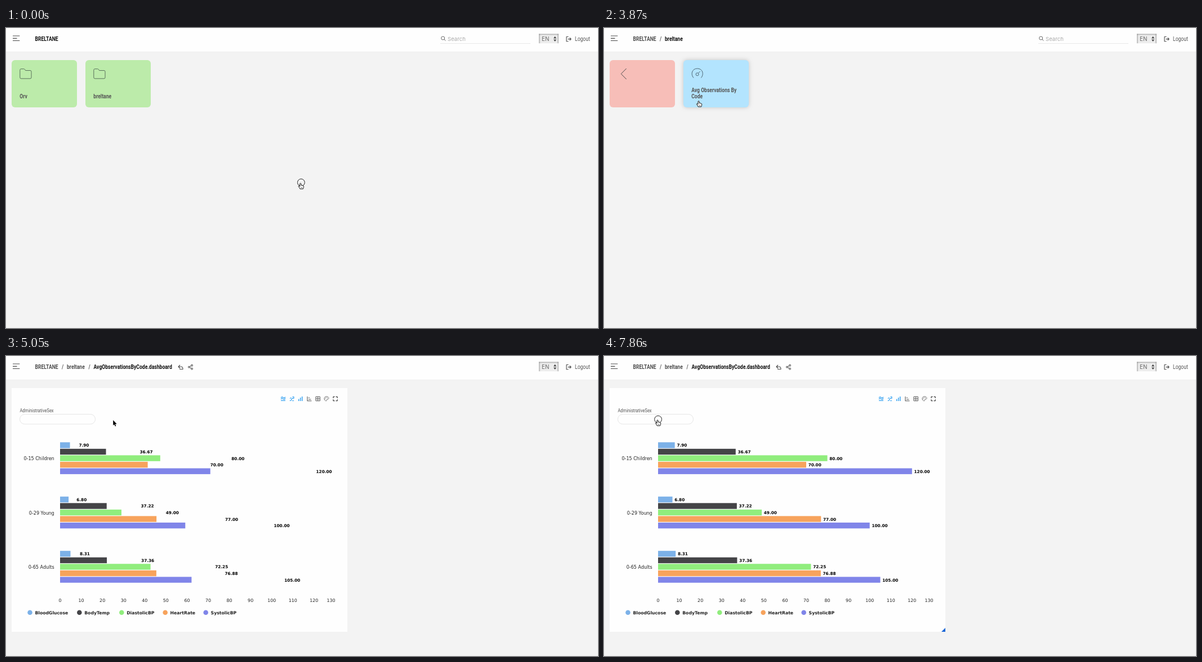
Write an HTML page with a canvas that moves like this. It is 1051 by 533 pixels and loops after 8 s.

```html
<!DOCTYPE html>
<html lang="en">
<head>
<meta charset="utf-8">
<title>Dashboard walkthrough</title>
<style>
  html, body { margin: 0; width: 100%; height: 100%; overflow: hidden; background: #f3f3f3; }
  canvas { display: block; }
</style>
</head>
<body>
<canvas id="stage" width="1051" height="533"></canvas>
<script>
const ctx = document.getElementById('stage').getContext('2d');
const LOOP = 8000;
const NARROW = 0.86; // condensed face for all interface text
const UI = 'Roboto, sans-serif';
const INPUT = 'Inter, sans-serif';
const CHART = '"DejaVu Sans", sans-serif';
const DARK = '#4a4a4a', BLUE = '#2b9df0';

const ROOT = 'BRELTANE', FOLDER = 'breltane';
const TILE = { x: 141, y: 57, w: 116, h: 84 };

// Pointer stops: time, x, y, shape
const STOPS = [
  [0, 522.8, 275.5, 'press'], [150, 480, 272, 'arrow'], [300, 370, 265, 'arrow'],
  [450, 297.5, 261.5, 'arrow'], [750, 304, 263, 'arrow'], [900, 309, 264, 'arrow'],
  [1350, 300, 245, 'arrow'], [1490, 270, 200, 'arrow'], [1640, 235, 155, 'arrow'],
  [1780, 207, 113, 'hand'], [1930, 200.6, 103, 'hand'], [2680, 200.6, 103, 'press'],
  [2820, 200.6, 103, 'hand'], [3120, 330, 150, 'arrow'], [3270, 560, 190, 'arrow'],
  [3420, 643, 198, 'arrow'], [3570, 570, 180, 'arrow'], [3720, 310, 150, 'arrow'],
  [3870, 168, 129.5, 'hand'], [4170, 168, 129.5, 'press'], [4320, 190.2, 114, 'arrow'],
  [5340, 420, 140, 'arrow'], [5490, 575.8, 161.3, 'arrow'], [6090, 640, 150, 'arrow'],
  [6240, 735, 138, 'arrow'], [6390, 780, 130, 'arrow'], [6540, 792, 125, 'arrow'],
  [6680, 775, 122, 'arrow'], [6830, 715, 121, 'arrow'], [6980, 635, 125, 'arrow'],
  [7130, 573, 131, 'arrow'], [7270, 440, 125, 'arrow'], [7420, 260, 117, 'arrow'],
  [7560, 140, 113, 'hand'], [7710, 95, 113.5, 'hand'], [7860, 95, 113.5, 'press']
];
const PAINTS = [4320, 4460, 4610, 4760, 4900, 5050, 5200, 5340, 5490];

const SERIES = [
  ['BloodGlucose', '#7cb1e8', 42.5, [7.9, 6.8, 8.31]],
  ['BodyTemp', '#444447', 130.3, [36.67, 37.22, 37.36]],
  ['DiastolicBP', '#90ed7d', 205.3, [80, 49, 72.25]],
  ['HeartRate', '#f7a35c', 282.7, [70, 77, 76.88]],
  ['SystolicBP', '#8085e9', 354.7, [120, 100, 105]]
];
const GROUPS = ['0-15 Children', '0-29 Young', '0-65 Adults'];

function write(s, x, y, size, color, { bold = false, align = 'left', face = UI } = {}) {
  ctx.save();
  ctx.font = `${bold ? 'bold ' : ''}${size}px ${face}`;
  ctx.textAlign = align;
  ctx.fillStyle = color;
  ctx.translate(x, y);
  if (face === UI) ctx.scale(NARROW, 1);
  ctx.fillText(s, 0, 0);
  ctx.restore();
}

function line(d, color = DARK, width = 1, x = 0, y = 0) {
  ctx.save();
  ctx.translate(x, y);
  ctx.strokeStyle = color;
  ctx.lineWidth = width;
  ctx.lineJoin = 'round';
  ctx.stroke(new Path2D(d));
  ctx.restore();
}

function shape(d, color, x = 0, y = 0) {
  ctx.save();
  ctx.translate(x, y);
  ctx.fillStyle = color;
  ctx.fill(new Path2D(d));
  ctx.restore();
}

function rect(x, y, w, h, color) {
  ctx.fillStyle = color;
  ctx.fillRect(x, y, w, h);
}

function dot(x, y, r, color) {
  ctx.fillStyle = color;
  ctx.beginPath();
  ctx.arc(x, y, r, 0, Math.PI * 2);
  ctx.fill();
}

function header(crumbs, search) {
  rect(0, 0, 1051, 42, '#fefefe');
  rect(0, 42, 1051, 1, '#efefef');
  line('M12 14H24.3M12 18.3H19.5M12 22.5H24.3', DARK, 1.2);
  const xs = [51.5, 108, 155.5];
  crumbs.forEach((c, i) => {
    const last = i === crumbs.length - 1;
    write(c, xs[i], 23.4, 10, last ? '#111' : '#505050', { bold: true });
    if (!last) write('/', xs[i + 1] - 9, 23.4, 10, '#555', { bold: true });
  });
  if (search) {
    line('M778.7 18A3 3 0 1 1 772.7 18A3 3 0 1 1 778.7 18M777.9 20.2L780.5 22.7', '#666');
    write('Search', 784, 23.2, 9.6, '#aaa', { face: INPUT });
    rect(771, 27, 160, 1, '#e8e8e8');
  } else {
    line('M309 16L306 19L309 22M306 19H311Q314 19 314 23.5H308', DARK, 1.1);
    line('M330 16.7L325 19.6L330 22.7', DARK);
    for (const [x, y] of [[330, 16.7], [325, 19.6], [330, 22.7]]) {
      dot(x, y, 1.9, DARK);
      dot(x, y, 0.9, '#fff');
    }
  }
  language();
  line('M998.5 15.5H995V23.8H998.5M997.5 19.6H1003M1000.7 17.1L1003.2 19.6L1000.7 22.1', DARK, 1.1);
  write('Logout', 1010, 23.4, 10, '#555');
}

function language() {
  rect(946, 10.5, 35, 16.7, '#ededed');
  const edge = (x0, y0, x1, y1, w, h) => {
    const g = ctx.createLinearGradient(x0, y0, x1, y1);
    g.addColorStop(0, 'rgba(120,120,120,.55)');
    g.addColorStop(1, 'rgba(120,120,120,0)');
    rect(Math.min(x0, x1), y0, w, h, g);
  };
  edge(946, 10.5, 946, 13.5, 35, 3);
  edge(946, 10.5, 949, 10.5, 3, 16.7);
  edge(981, 10.5, 978, 10.5, 3, 16.7);
  write('EN', 951, 23.3, 9.8, '#666', { face: INPUT });
  shape('M972 18.4L974.6 14.8L977.2 18.4ZM972 20.4L974.6 24L977.2 20.4Z', '#444');
}

function tile(x, color, hover) {
  ctx.save();
  if (hover) {
    ctx.shadowColor = 'rgba(0,0,0,.2)';
    ctx.shadowBlur = 7;
  }
  ctx.fillStyle = color;
  ctx.beginPath();
  ctx.roundRect(x, TILE.y, TILE.w, TILE.h, 6);
  ctx.fill();
  ctx.restore();
}

function folder(x, name, hover) {
  tile(x, '#bcebaa', hover);
  line('M2 0H6.8Q8 0 8.6 1L9.8 2.8H18.2Q20.2 2.8 20.2 4.8V15.2Q20.2 17.2 18.2 17.2H2Q0 17.2 0 15.2V2Q0 0 2 0Z',
    '#58705a', 1, x + 14.8, 72.7);
  write(name, x + 14.3, 125, 10, '#555', { bold: true });
}

function homePage(hover) {
  header([ROOT], true);
  folder(10, 'Orv', false);
  folder(TILE.x, FOLDER, hover);
}

function folderPage(hover) {
  header([ROOT, FOLDER], true);
  tile(10, '#f7beb8', false);
  line('M39.7 72L30.3 81.5L39.7 91', DARK);
  tile(TILE.x, '#b3e4fe', hover);
  line('M159 88.5C153.5 82.5 156 72 165.7 72C175.4 72 177.9 82.5 172.4 88.5', '#4d6674');
  line('M168.1 82.2A2.5 2.5 0 1 1 163.1 82.2A2.5 2.5 0 1 1 168.1 82.2M167.4 80.3L170.7 77', '#4d6674');
  write('Avg Observations By', 155.2, 114.2, 10, '#555', { bold: true });
  write('Code', 155.2, 125, 10, '#555', { bold: true });
}

function toolbar() {
  line('M488 74.2Q490 71.8 492 73.6T496 73M488 76.7Q490 74.3 492 76.1T496 75.5M488 79.2H496', BLUE, 1.2);
  line('M503.7 79Q506 80 507 77T511.3 75.5M504 75.5L506.5 74M508.5 72.5H511V75M508 79.5H511', BLUE, 1.1);
  line('M519.7 76.5V80M522.7 74V80M525.7 72V80', BLUE, 1.4);
  line('M535 72V79.8H542.5M537 74H539M537 77H541.5', '#555', 1.1);
  line('M550 72.3H557.4V79.7H550ZM553.7 72.3V79.7M550 76H557.4', '#555');
  line('M569 72C574 72 574 77 571 76.5C568.5 76.2 570.5 79.8 568.5 79.8C563.5 79 563.8 72 569 72Z', '#777');
  for (const [x, y] of [[566.6, 76], [568, 74], [570.5, 74]]) dot(x, y, 0.7, '#777');
  line('M581 75V72.4H583.6M585.6 72.4H588.2V75M588.2 77V79.6H585.6M583.6 79.6H581V77', '#444', 1.2);
}

function spinner(t) {
  const turn = (t - 4460) / 1000 * Math.PI * 2;
  ctx.strokeStyle = '#5580bf';
  ctx.lineWidth = 1.7;
  for (const [from, to] of [[-2.45, -0.7], [0, 0.55], [1.05, 2.35]]) {
    ctx.beginPath();
    ctx.arc(308.5, 288.6, 10.6, from + turn, to + turn);
    ctx.stroke();
  }
}

function chart(t) {
  const unit = 3.757, left = 96;
  const p = Math.min(1, Math.max(0, (t - 4493) / 997));
  const grow = (1 - Math.cos(Math.PI * p)) / 2;
  const opts = { face: CHART };
  GROUPS.forEach((name, g) => {
    const top = 153.3 + g * 96.45;
    write(name, 85.7, top + 31.8, 8.05, '#222', { ...opts, align: 'right' });
    SERIES.forEach(([, color, , values], i) => {
      const v = values[g], y = top + i * 11.55;
      rect(left, y, v * unit * grow, 10.4, color);
      write(v.toFixed(2), left + v * unit + 3.7, y + 8.1, 7.3, '#000', { ...opts, bold: true });
    });
  });
  for (let n = 0; n <= 130; n += 10) {
    write(n, n === 130 ? 577 : left + n * unit, 437, 7.9, '#222', { ...opts, align: 'center' });
  }
  for (const [name, color, x] of SERIES) {
    dot(x, 455.8, 4.3, color);
    write(name, x + 8.9, 459, 7.72, '#222', { ...opts, bold: true });
  }
}

function dashboardPage(t, active) {
  header([ROOT, FOLDER, 'AvgObservationsByCode.dashboard'], false);
  rect(10, 57, 596, 433, '#fefefe');
  toolbar();
  write('AdministrativeSex', 24.5, 100.2, 8.7, '#555');
  ctx.strokeStyle = '#e6e6e6';
  ctx.lineWidth = 1;
  ctx.beginPath();
  ctx.roundRect(24.5, 103.5, 134, 17.5, 8.7);
  ctx.stroke();
  const painted = PAINTS.filter(p => p <= t).pop();
  if (painted < 4610) spinner(painted);
  else chart(painted);
  if (active) shape('M599 490L606 483V490Z', '#1a66d6');
}

function pointer(x, y, kind) {
  if (kind === 'arrow') {
    const d = 'M0 0V9.3L2.1 7.5L3.6 10.9L5.1 10.2L3.6 7L6.4 6.7Z';
    line(d, '#fff', 1.4, x, y);
    shape(d, '#000', x, y);
    return;
  }
  if (kind === 'press') line('M7.5 -1A6.4 6.4 0 1 1 -5.3 -1A6.4 6.4 0 1 1 7.5 -1', '#222', 1, x, y);
  const d = 'M-1.1 1Q0 -.7 1.1 1V4Q2.8 3 3.1 4.4Q4.4 3.8 4.6 5Q5.8 4.8 5.7 6.2L5.4 8.2L4.6 10.4H-.8L-1.7 8.5L-3.6 6Q-3.6 4.6 -2.3 5.2L-1.1 6.2Z';
  shape(d, '#fff', x, y);
  line(d, '#111', 1, x, y);
  line('M1.1 7V9M2.8 7V9', '#111', 0.6, x, y);
}

function draw(t) {
  const [, x, y, kind] = STOPS.filter(s => s[0] <= t).pop();
  const hover = x > TILE.x && x < TILE.x + TILE.w && y > TILE.y && y < TILE.y + TILE.h;
  rect(0, 0, 1051, 533, '#f3f3f3');
  if (t < 2820) homePage(hover);
  else if (t < 4320) folderPage(hover);
  else dashboardPage(t, t >= 5340 && x < 606);
  pointer(x, y, kind);
}

const start = performance.now();
function tick() {
  draw((performance.now() - start) % LOOP);
  requestAnimationFrame(tick);
}
tick();
</script>
</body>
</html>
```
